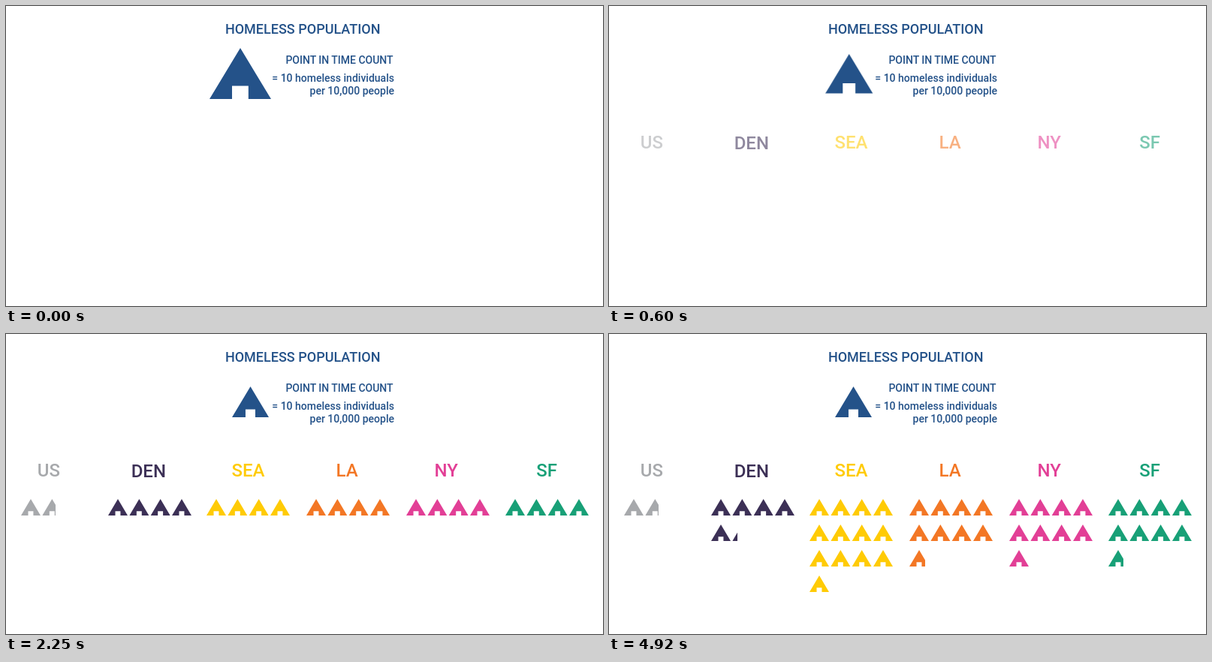
Recreate the animation shown at these times as an HTML page. Size 795x400 px, loop 5550 ms.

```html
<!DOCTYPE html>
<html lang="en">
<head>
<meta charset="utf-8">
<title>Homeless population</title>
<style>
  html, body { margin: 0; width: 100%; height: 100%; overflow: hidden; background: #fff; }
  svg { display: block; }
  text { font-family: Roboto, sans-serif; font-weight: 500; }
  .key { fill: #245289; font-size: 14px; }
  .key .title { font-size: 18px; }
  .key .right { text-anchor: end; }
  .city { font-size: 24px; }

  #sign, .city, .row { animation: 5550ms step-end infinite; }
  #sign { transform-origin: 0 0; animation-name: shrink; }
  .city { animation-name: fade; }
  .row1 { animation-name: row1; }
  .row2 { animation-name: row2; }
  .row3 { animation-name: row3; }
  .row4 { animation-name: row4; }

  @keyframes shrink {
    0% { transform: translate(271px, 56px) scale(82, 68); animation-timing-function: steps(35, end); }
    18.918%, 100% { transform: translate(301px, 70px) scale(49, 41); }
  }
  @keyframes fade {
    0% { opacity: 0; animation-timing-function: steps(35, end); }
    18.918%, 100% { opacity: 1; }
  }
  @keyframes row1 { 0% { opacity: 0; } 40.54%, 100% { opacity: 1; } }
  @keyframes row2 { 0% { opacity: 0; } 53.153%, 100% { opacity: 1; } }
  @keyframes row3 { 0% { opacity: 0; } 71.171%, 100% { opacity: 1; } }
  @keyframes row4 { 0% { opacity: 0; } 88.648%, 100% { opacity: 1; } }
</style>
</head>
<body>
<svg id="stage" width="795" height="400" viewBox="0 0 795 400">
  <defs>
    <path id="house" d="M.5 0L1 1H.632V.742H.366V1H0Z"/>
  </defs>
  <g class="key">
    <text class="title" x="291.9" y="37">HOMELESS POPULATION</text>
    <text class="right" x="515.6" y="77">POINT IN TIME COUNT</text>
    <text class="right" x="517" y="101">= 10 homeless individuals</text>
    <text class="right" x="517" y="118">per 10,000 people</text>
    <g id="sign"><use href="#house"/></g>
  </g>
</svg>
<script>
  const NS = 'http://www.w3.org/2000/svg';
  const W = 26, H = 22, STEP_X = 28.33, STEP_Y = 34, TOP = 220, PER_ROW = 4;

  // part: visible width of the last, cut-off house
  const cities = [
    { name: 'US', color: '#a7a9ac', textX: 41.8, baseline: 190, x: 20, whole: 1, part: 17.7 },
    { name: 'DEN', color: '#3c3056', textX: 166.7, baseline: 191, x: 136, whole: 5, part: 6.7 },
    { name: 'SEA', color: '#ffcb05', textX: 300.4, baseline: 190, x: 267, whole: 13, part: 0 },
    { name: 'LA', color: '#f37725', textX: 439.5, baseline: 190, x: 400, whole: 8, part: 21 },
    { name: 'NY', color: '#e23f96', textX: 570.5, baseline: 190, x: 533, whole: 9, part: 0 },
    { name: 'SF', color: '#18a077', textX: 706.3, baseline: 190, x: 665, whole: 8, part: 20 }
  ];

  function add(parent, tag, attrs) {
    const el = document.createElementNS(NS, tag);
    for (const key in attrs) el.setAttribute(key, attrs[key]);
    return parent.appendChild(el);
  }

  function addHouse(parent, x, y, width) {
    const box = add(parent, 'svg', { x, y, width, height: H });
    add(box, 'use', { href: '#house', transform: `scale(${W} ${H})` });
  }

  const stage = document.getElementById('stage');
  const rows = [1, 2, 3, 4].map(n => add(stage, 'g', { class: `row row${n}` }));

  for (const c of cities) {
    add(stage, 'text', { class: 'city', x: c.textX, y: c.baseline, fill: c.color }).textContent = c.name;
    const groups = rows.map(row => add(row, 'g', { fill: c.color }));
    const count = c.whole + (c.part ? 1 : 0);
    for (let i = 0; i < count; i++) {
      const row = Math.floor(i / PER_ROW);
      const x = c.x + i % PER_ROW * STEP_X;
      addHouse(groups[row], x, TOP + row * STEP_Y, i < c.whole ? W : c.part);
    }
  }
</script>
</body>
</html>
```
